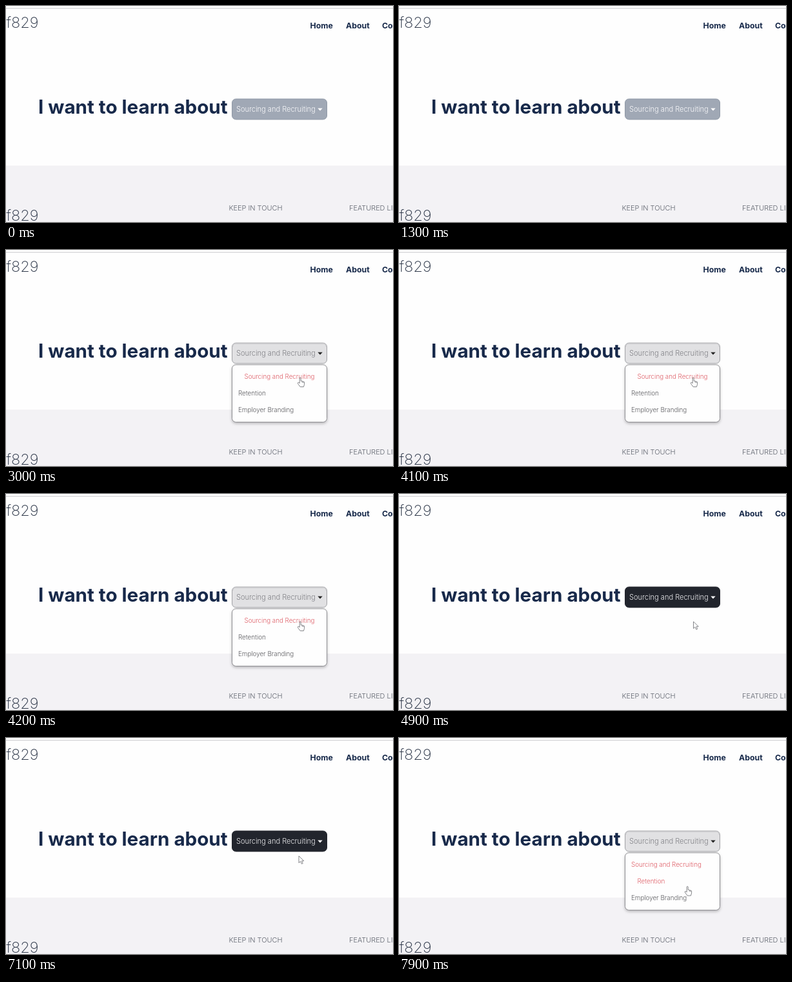
An HTML page that plays this animation: 600x337 px, repeating every 8000 ms.

```html
<!DOCTYPE html>
<html lang="en">
<head>
<meta charset="utf-8">
<title>Topic picker</title>
<style>
  html, body { margin: 0; width: 100%; height: 100%; overflow: hidden; background: #fefefe; }
  svg { display: block; width: 600px; height: 337px; font-family: Inter, "Open Sans", sans-serif; }
  .brand { font-size: 23.5px; font-weight: 200; fill: #2b3547; text-anchor: end; }
  .nav { font-size: 12.3px; font-weight: 650; fill: #17294a; }
  .title { font-size: 29.6px; font-weight: 680; fill: #17294a; }
  .foot { font-size: 10.9px; font-weight: 350; fill: #5c616b; }
  .label { font-size: 11.05px; font-weight: 350; }
  .item { font-size: 9.8px; font-weight: 350; fill: #5a5a5e; }
  #panel { filter: drop-shadow(0 2px 2px rgba(0, 0, 0, .25)); }
  .cursor path { fill: #fff; stroke: #66676c; stroke-width: .8; stroke-linejoin: round; }
</style>
</head>
<body>
<svg viewBox="0 0 600 337">
  <rect width="600" height="337" fill="#fefefe"/>
  <rect y="3" width="600" height="1.2" fill="#d3d3d5"/>
  <rect y="249" width="600" height="88" fill="#f3f2f5"/>

  <text class="brand" x="50.5" y="34">f829</text>
  <text class="brand" x="50.5" y="335">f829</text>
  <g class="nav">
    <text x="471.5" y="34.5">Home</text>
    <text x="527" y="34.5">About</text>
    <text x="583" y="34.5">Contact</text>
  </g>
  <text class="title" x="50" y="168">I want to learn about</text>
  <text class="foot" x="345.5" y="319">KEEP IN TOUCH</text>
  <text class="foot" x="532" y="319">FEATURED LINKS</text>

  <rect id="button" x="350.5" y="145" width="147" height="32" rx="6"/>
  <path id="inset" d="M351.5 151q0-5 5-5h135q5 0 5 5" fill="none" stroke="#c9c9cc" stroke-width="1.5"/>
  <text id="label" class="label" x="357" y="164.5">Sourcing and Recruiting</text>
  <path id="caret" d="M483.3 159.5h7.4l-3.7 3.9z"/>

  <g id="menu">
    <rect id="panel" x="350.5" y="179" width="147" height="89.5" rx="6" fill="#fefefe" stroke="#848488" stroke-width=".9"/>
    <text class="item" x="360" y="201.2">Sourcing and Recruiting</text>
    <text class="item" x="360" y="227">Retention</text>
    <text class="item" x="360" y="252.5">Employer Branding</text>
  </g>

  <g id="arrow" class="cursor">
    <path d="M0 0V10.8L2.6 8.5L4.4 12.4L6.2 11.6L4.5 7.8H7.8Z"/>
  </g>
  <g id="hand" class="cursor">
    <path d="M3.2 9V1.2Q3.2 0 4.2 0T5.2 1.2V5.4Q7 4.7 7.2 6Q8.8 5.4 9 6.6Q10.6 6.2 10.6 7.8V10.5L9.4 14.5H4.2L.5 9.5Q-.2 8 1 7.6Q2 7.5 3.2 9Z"/>
    <path d="M7.2 6V8M9 6.6V8.4" fill="none"/>
  </g>
</svg>
<script>
const LOOP = 8000, STEP = 100;
const $ = id => document.getElementById(id);
const items = document.querySelectorAll('.item');

// button looks: fill, border, text, caret
const looks = {
  idle: ['#a0a8b5', '#8f98a6', '#fafafc', '#fff'],
  open: ['#e1e1e3', '#a0a1a5', '#808186', '#222'],
  focus: ['#22252d', '#22252d', '#f1f1f3', '#fff']
};

// pointer path: time, x, y
const path = [
  [1500, 484, 192], [1900, 484, 192], [2600, 473, 182], [2700, 454, 197],
  [2900, 452, 199], [4200, 452, 199], [4300, 456.5, 199], [5600, 456.5, 199],
  [6200, 454, 184], [7100, 454, 184], [7200, 443, 231.5], [LOOP, 443, 231.5]
];
const openings = [
  { from: 2700, to: 4300, hover: 0 },
  { from: 7200, to: LOOP, hover: 1 }
];

const show = (el, on) => el.style.display = on ? '' : 'none';

function pointer(t) {
  const i = path.findIndex(p => p[0] > t);
  if (i < 1) return null;
  const [t0, x0, y0] = path[i - 1], [t1, x1, y1] = path[i];
  const k = (t - t0) / (t1 - t0);
  return [x0 + (x1 - x0) * k, y0 + (y1 - y0) * k];
}

function draw(t) {
  const menu = openings.find(o => t >= o.from && t < o.to);
  const [fill, border, text, caret] = looks[menu ? 'open' : t < 4300 ? 'idle' : 'focus'];
  $('button').setAttribute('fill', fill);
  $('button').setAttribute('stroke', border);
  $('label').setAttribute('fill', text);
  $('caret').setAttribute('fill', caret);
  show($('inset'), menu);
  show($('menu'), menu);

  if (menu) {
    const k = Math.min(1, (t - menu.from) / 300);
    const slide = 1 - (1 - k) ** 2;
    items.forEach((item, i) => {
      item.setAttribute('x', 360 + (i === menu.hover ? 9.5 * slide : 0));
      item.style.fill = i <= menu.hover ? '#de5d66' : '';
    });
  }

  const pos = pointer(t);
  show($('arrow'), pos && !menu);
  show($('hand'), pos && menu);
  if (pos) $(menu ? 'hand' : 'arrow').setAttribute('transform', `translate(${pos})`);
}

function tick() {
  draw(Math.floor(performance.now() % LOOP / STEP) * STEP);
  requestAnimationFrame(tick);
}
tick();
</script>
</body>
</html>
```
